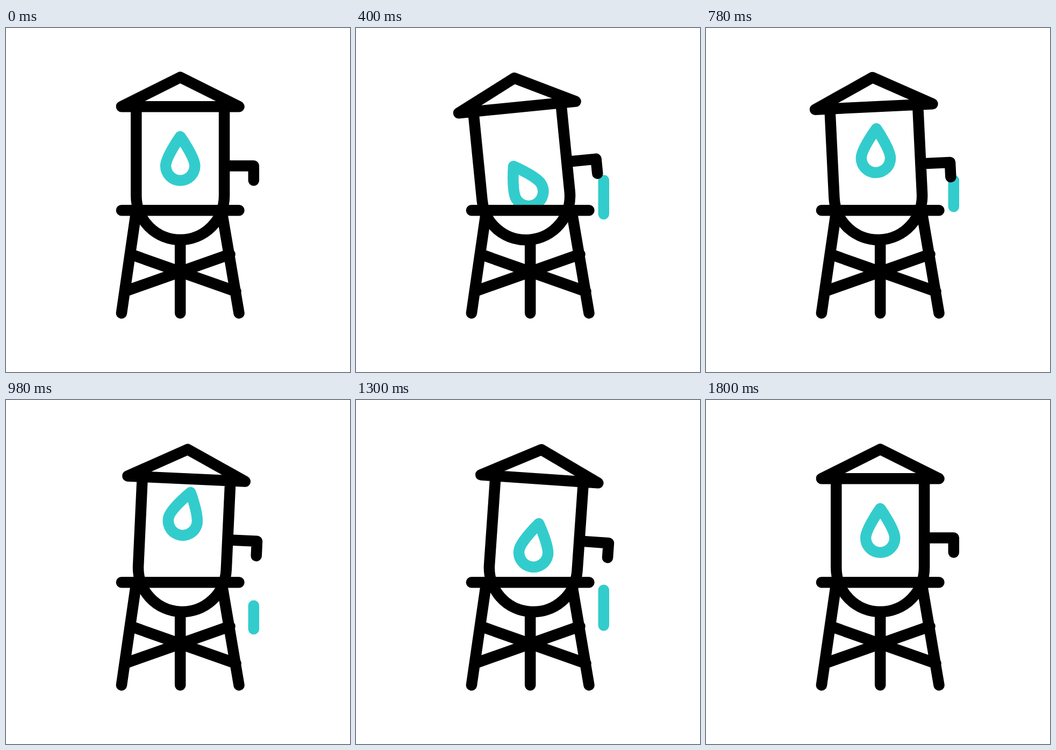
An HTML page for the animation above (2400 ms loop, 640 by 640 pixels).

```html
<!DOCTYPE html>
<html lang="en">
<head>
<meta charset="utf-8">
<title>Water tower</title>
<style>
  html, body { margin: 0; height: 100%; overflow: hidden; background: #fff; }
  svg { display: block; width: 100%; height: 100%; }
  path { fill: none; stroke: #000; stroke-width: 20.5; stroke-linecap: round; stroke-linejoin: round; }
  .water { stroke: #3cc; }
</style>
</head>
<body>
<svg viewBox="0 0 640 640">
  <path id="stream" class="water"/>
  <g id="tank">
    <path id="drop" class="water" d="M324.2 202C324.2 202 297.1 240 297.1 256.6a27.1 27.1 0 0 0 54.2 0C351.3 240 324.2 202 324.2 202Z"/>
    <path d="M214.9 146.2L324.2 91.6L433.5 146.2ZM242.3 146.2V312a81.9 81.9 0 0 0 163.8 0V146.2M406.1 256.4H460.8V283.6"/>
  </g>
  <path d="M214.9 339.2H433.5M242.6 339.2L214.9 530.5M401 339.2L433.5 530.5M324.2 394V530.5M232 421L427.5 490M416.5 421L221 490"/>
</svg>
<script>
const LOOP = 2400, MOVE = 1800, STEP = 20;
const SPOUT = 283.6, FALL = 143;

// Keys are [time, value] pairs
const tilt = [[0, 0], [540, -6.8], [1140, 4.65], [1800, 0]];
const bob = [[0, 0], [470, 52], [920, -34.8], [1380, 32.4], [1800, 0]];
const swing = [[0, 0], [470, -27.1], [920, 13], [1380, 6], [1800, 0]];
const pours = [0, 403, 758, 1112];

const $ = id => document.getElementById(id);

function ease(t, start, length) {
  const u = Math.min(1, Math.max(0, (t - start) / length));
  return u * u * (3 - 2 * u);
}

function valueAt(keys, t) {
  let v = keys[0][1];
  for (let i = 1; i < keys.length; i++) {
    const [t0, v0] = keys[i - 1], [t1, v1] = keys[i];
    v += (v1 - v0) * ease(t, t0, t1 - t0);
  }
  return v;
}

function streamPath(t) {
  return pours.map(p => {
    const head = ease(t - p, 240, 350), tail = ease(t - p, 416, 255);
    return head - tail > 0.001
      ? `M460.8 ${SPOUT + FALL * tail}V${SPOUT + FALL * head}` : "";
  }).join("");
}

function draw(now) {
  const t = Math.min(MOVE, Math.floor(now % LOOP / STEP) * STEP);
  $("tank").setAttribute("transform", `rotate(${valueAt(tilt, t)} 324.2 393.5)`);
  $("drop").setAttribute("transform", `translate(0 ${valueAt(bob, t)}) rotate(${valueAt(swing, t)} 324.2 242.8)`);
  $("stream").setAttribute("d", streamPath(t));
}

const begin = performance.now();
function tick() {
  draw(performance.now() - begin);
  requestAnimationFrame(tick);
}
tick();
</script>
</body>
</html>
```
